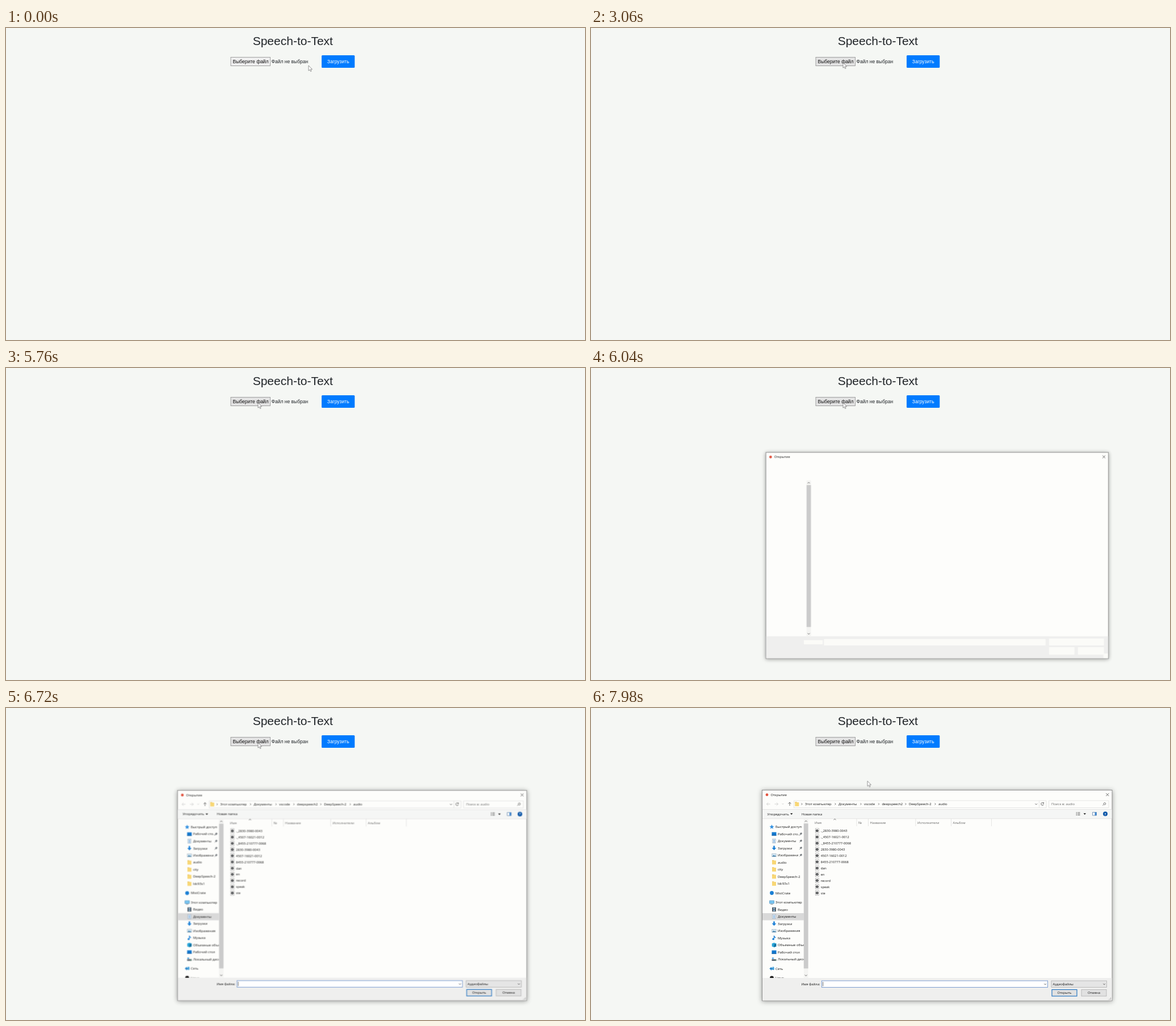
Animation of 1020x549 px, one loop 8 s. Source, as an HTML page:

```html
<!DOCTYPE html>
<html lang="ru">
<head>
<meta charset="utf-8">
<title>Speech-to-Text</title>
<style>
html, body { margin: 0; width: 100%; height: 100%; overflow: hidden; background: #f5f7f4; }
svg { display: block; width: 100%; height: 100%; }
.page { font-family: "Liberation Sans", Arial, sans-serif; font-size: 8.5px; }
.dialog { font-family: "Open Sans", "Noto Sans", sans-serif; font-size: 5.9px; fill: #141414;
  transform-origin: 609.75px 329.75px; animation: open 8s linear infinite; }
.frame { filter: drop-shadow(.5px 1.5px 4px rgba(0, 0, 0, .38)); }
.line { fill: none; stroke: #4a4a4a; stroke-width: .8; }
.soft { fill: none; stroke: #dcdcdc; stroke-width: .7; }
.pale { fill: none; stroke: #c8c8c8; stroke-width: .8; }
.dim { fill: #666; }
.cursor { animation: move 8s linear infinite; }
.choose { animation: hover 8s step-end infinite; }
.empty { animation: leave 8s step-end infinite; }
.full { animation: arrive 8s step-end infinite; }

@keyframes move {
  0% { transform: translate(533px, 66px); animation-timing-function: ease-in-out; }
  13.5% { transform: translate(547px, 84px); animation-timing-function: ease-in-out; }
  19% { transform: translate(451px, 69px); }
  23%, 26% { transform: translate(447px, 70px); animation-timing-function: ease-in-out; }
  35% { transform: translate(445px, 62px); }
  38.25%, 91.5% { transform: translate(444px, 61px); animation-timing-function: ease-in; }
  99.75%, 100% { transform: translate(487px, 128.5px); }
}
@keyframes hover { 0% { fill: #efefef; } 30% { fill: #e3e3e3; } 100% { fill: #e3e3e3; } }
@keyframes open {
  0%, 73.5% { transform: scale(.965); opacity: 0; }
  75.25% { transform: scale(.978); opacity: 1; }
  77.25% { transform: scale(.985); opacity: 1; }
  82% { transform: scale(.9935); opacity: 1; }
  85%, 100% { transform: scale(1); opacity: 1; }
}
@keyframes leave { 0% { opacity: 1; } 83.75% { opacity: 0; } 100% { opacity: 0; } }
@keyframes arrive { 0% { opacity: 0; } 83.75% { opacity: 1; } 100% { opacity: 1; } }
</style>
</head>
<body>
<svg viewBox="0 0 1020 549" preserveAspectRatio="none">
  <defs>
    <clipPath id="side"><rect x="302" y="195" width="72.5" height="279.5"/></clipPath>
  </defs>

  <g class="page">
    <text x="505.3" y="30" font-size="21" text-anchor="middle" fill="#212529">Speech-to-Text</text>
    <rect class="choose" x="396" y="51.5" width="69.5" height="15" stroke="#999" stroke-width=".9"/>
    <text x="399.5" y="61.8" fill="#111">Выберите файл</text>
    <text x="467.5" y="61.8" fill="#212529">Файл не выбран</text>
    <rect x="556" y="48" width="58.3" height="22" rx="1.5" fill="#007bff"/>
    <text x="585.2" y="61.8" text-anchor="middle" fill="#fff">Загрузить</text>
  </g>

  <g class="dialog">
    <rect class="frame" x="301.5" y="144.5" width="616.5" height="370.5" fill="#fdfdfb" stroke="#858585" stroke-width=".9"/>
    <circle cx="310" cy="152.7" r="2.4" fill="#e2533f"/>
    <text x="316.5" y="154.7">Открытие</text>
    <path class="line" d="M907.3 150l5 5m0-5l-5 5"/>
    <rect x="302" y="475" width="615.5" height="39.5" fill="#efefee"/>

    <g class="empty" fill="#fbfbf8">
      <rect x="370" y="482" width="34" height="7.5"/>
      <rect x="406" y="480" width="399" height="11.5"/>
      <rect x="811" y="479" width="99" height="12.5"/>
      <rect x="811" y="494.5" width="46" height="13.5"/>
      <rect x="863" y="494.5" width="47" height="13.5"/>
      <rect x="909" y="506" width="8" height="8"/>
    </g>

    <g class="full">
      <rect x="302" y="178.5" width="615.5" height="16" fill="#f5f6f5"/>
      <path class="soft" d="M302 178.5h615.5M302 194.7h615.5"/>
      <path class="pale" d="M315.5 169h-6m2.5-2.5l-2.5 2.5 2.5 2.5M323.5 169h6m-2.5-2.5l2.5 2.5-2.5 2.5M336.5 168l1.5 1.5 1.5-1.5"/>
      <path class="line" d="M350 172v-6m-2.5 2.5l2.5-2.5 2.5 2.5"/>
      <path class="soft" d="M357.5 163h444.5v12.5h-444.5zM789.5 163v12.5M806.5 163h105.5v12.5h-105.5z"/>
      <path class="line" d="M782.5 168.3l1.8 1.8 1.8-1.8M797.2 167.5a2.4 2.4 0 1 0 .3 2M797.5 166v1.8h-1.8"/>
      <g id="crumbs"></g>
      <text class="dim" x="811" y="171.2">Поиск в: audio</text>
      <path class="line" d="M901.5 171.5l2-2a1.8 1.8 0 1 1 .4 .4"/>

      <text x="310.5" y="188.5">Упорядочить</text>
      <path d="M351 185.3h4.4l-2.2 2.4z"/>
      <text x="371" y="188.5">Новая папка</text>
      <path class="line" d="M854.5 184h2m1 0h4M854.5 186.2h2m1 0h4M854.5 188.4h2m1 0h4"/>
      <path d="M867.6 185.3h4.4l-2.2 2.4z"/>
      <path d="M883.5 183.5h7v5.5h-7z" fill="#fff" stroke="#5b7fa8" stroke-width=".8"/>
      <path d="M887.5 183.5h3v5.5h-3z" fill="#3f86cf"/>
      <circle cx="906" cy="186.3" r="4" fill="#0b56a8"/>
      <text x="906" y="188.5" text-anchor="middle" fill="#fff" font-weight="700">?</text>

      <g id="cols"></g>
      <g id="files" font-size="5.7"></g>
      <g clip-path="url(#side)">
        <rect x="302" y="361" width="73" height="12.5" fill="#d9d9d9"/>
        <g id="tree"></g>
      </g>

      <text x="403.5" y="488" text-anchor="end">Имя файла:</text>
      <rect x="406.5" y="480" width="398" height="11.5" fill="#fff" stroke="#6f93cc" stroke-width=".9"/>
      <path class="line" d="M408.7 482v7.5M798.2 485l1.9 1.9 1.9-1.9"/>
      <rect x="811" y="480" width="97.5" height="11.5" fill="#e5e5e5" stroke="#b0b0b0" stroke-width=".8"/>
      <text x="813.5" y="488">Аудиофайлы</text>
      <path class="line" d="M902.2 485l1.9 1.9 1.9-1.9"/>
      <rect x="812" y="495.5" width="44" height="11.5" fill="#e1e1e1" stroke="#1b6fc0" stroke-width="1.1"/>
      <text x="834" y="503.4" text-anchor="middle">Открыть</text>
      <rect x="864" y="495.5" width="44" height="11.5" fill="#e1e1e1" stroke="#b0b0b0" stroke-width=".8"/>
      <text x="886" y="503.4" text-anchor="middle">Отмена</text>
      <path d="M915.5 509.5v4M913.5 511.5v2M911.5 512.8v.7" stroke="#aaa" stroke-width=".9"/>
    </g>

    <rect x="374.8" y="195" width="7.8" height="279.8" fill="#f4f4f2"/>
    <rect x="374.8" y="203.3" width="7.8" height="255" fill="#cbcbcb"/>
    <path class="line" d="M376.7 200.2l2-2 2 2M376.7 469.5l2 2 2-2"/>
  </g>

  <path class="cursor" d="M0 0v9.2l2.1-1.9 1.5 3.2 1.5-.7-1.5-3.1h2.9z" fill="#fff" stroke="#6a6a6a" stroke-width=".7"/>
</svg>
<script>
const put = (id, html) => document.getElementById(id).innerHTML = html;
const text = (x, y, s, cls = '') => `<text x="${x}" y="${y + 2.1}" class="${cls}">${s}</text>`;
const box = (x, y, w, h, fill) => `<rect x="${x}" y="${y}" width="${w}" height="${h}" fill="${fill}"/>`;
const path = (d, fill) => `<path d="${d}" fill="${fill}"/>`;
const at = (x, y, body) => `<g transform="translate(${x} ${y})">${body}</g>`;
const dot = fill => `<circle r="3.4" fill="${fill}"/>`;

// 8px icons centred on their own origin
const icons = {
  star: path('M0-4l1.1 2.7 2.9.2-2.2 1.9.7 2.9-2.5-1.6-2.5 1.6.7-2.9-2.2-1.9 2.9-.2z', '#2f8fe0'),
  desk: box(-4, -3, 8, 6, '#1479cf') + box(-4, 1.7, 8, 1.3, '#0a5ba5'),
  doc: box(-3, -4, 6, 8, '#8fa6bd') + box(-2.3, -3.3, 4.6, 6.6, '#f3f8fc') +
    [-2, -.2, 1.6].map(y => box(-1.5, y, 3, .8, '#4b8fd0')).join(''),
  down: path('M-1.3-4h2.6v3.6h2.5l-3.8 4.2-3.8-4.2h2.5z', '#1b7fd6'),
  pic: box(-4, -3, 8, 6, '#9aa7b3') + box(-3.4, -2.4, 6.8, 4.8, '#d9ecf8') +
    path('M-3.4 2.4l2.4-3 1.8 1.6 1.2-1 1.4 2.4z', '#4c86ad'),
  folder: box(-3.5, -3.7, 3.5, 2, '#e5b64a') + box(-3.5, -3, 7, 6.8, '#f8d775'),
  pc: box(-4.2, -3.3, 8.4, 5.5, '#3a86bd') + box(-3.5, -2.6, 7, 4.1, '#7cc8f2') + box(-2.2, 2.8, 4.4, .9, '#647887'),
  film: box(-3.3, -3.7, 6.6, 7.4, '#3d4650') + box(-1.7, -3, 3.4, 2.7, '#8db3cf') + box(-1.7, .4, 3.4, 2.7, '#8db3cf'),
  note: path('M-.7-4h1.2q.3 2 2.5 3l-.4 1.6q-1-1.1-2.1-1.4v3a1.9 1.6 0 1 1-1.2-1.5z', '#1c80d8'),
  cube: path('M0-3.9l3.8 1.3v5.2l-3.8 1.3-3.8-1.3v-5.2z', '#2aa5d8') + path('M0-1l3.8-1.6v5.2l-3.8 1.3z', '#13709f'),
  disk: box(-4, 0, 8, 3, '#5c6670') + box(-3.6, -2.6, 3, 1.9, '#2a93e0') + box(1.8, 1, 1.4, 1, '#6fe08a'),
  net: path('M-4.2 0l3.7-3v1.7h4.5v3h-4.5v1.7z', '#2b86cb') + box(1, -3, 2.8, 5.5, '#4ba5dd'),
  cloud: dot('#1a7fd4'),
  black: dot('#1d1d1d')
};

const tree = [
  [209, 'star', 'Быстрый доступ'], [221.5, 'desk', 'Рабочий сто…', 1],
  [234, 'doc', 'Документы', 1], [246.5, 'down', 'Загрузки', 1],
  [259, 'pic', 'Изображени', 1], [271.5, 'folder', 'audio'],
  [284, 'folder', 'city'], [296.5, 'folder', 'DeepSpeech-2'],
  [309, 'folder', 'ldc93s1'], [325.5, 'cloud', 'MistCrate'],
  [342, 'pc', 'Этот компьютер'], [354.5, 'film', 'Видео'],
  [367, 'doc', 'Документы'], [379.5, 'down', 'Загрузки'],
  [392, 'pic', 'Изображения'], [404.5, 'note', 'Музыка'],
  [417, 'cube', 'Объемные объекты'], [429.5, 'desk', 'Рабочий стол'],
  [442, 'disk', 'Локальный диск'], [458.5, 'net', 'Сеть'], [475, 'black', 'Linux']
];
const roots = ['star', 'cloud', 'pc', 'net', 'black'];
const pin = path('M.5-2.8l2.3 2.3-.8.3-1 1.1-.1 1.2-1.3-1.3-2 2-.4-.4 2-2-1.3-1.3 1.2-.1 1.1-1z', '#70757a');
put('tree', tree.map(([y, icon, label, pinned]) => {
  const root = roots.includes(icon);
  return at(root ? 318.5 : 322.5, y, icons[icon]) + text(root ? 325 : 329, y, label) +
    (pinned ? at(369.5, y, pin) : '');
}).join(''));

const crumbs = [[377, 'Этот компьютер'], [436, 'Документы'], [481, 'vscode'],
  [512.5, 'deepspeech2'], [560, 'DeepSpeech-2'], [612, 'audio']];
put('crumbs', at(362.8, 169, icons.folder) + crumbs.map(([x, s]) =>
  `<path class="line" d="M${x - 6.3} 167.5l1.5 1.5-1.5 1.5"/>` + text(x, 169, s)).join(''));

const cols = [[394, 'Имя', 468], [471, '№', 488.5], [491.5, 'Название', 572],
  [575, 'Исполнители', 634.5], [637.5, 'Альбом', 705.5]];
put('cols', cols.map(([x, s, end]) =>
  text(x, 201.5, s, 'dim') + `<path class="soft" d="M${end} 195v13"/>`).join('') +
  '<path class="line" d="M427.5 196.8l2-1.5 2 1.5"/>');

const names = ['2830-3980-0043', '4507-16021-0012', '8455-210777-0068'];
const files = [...names.map(n => '._' + n), ...names, 'dan', 'en', 'record', 'speak', 'ste'];
const audio = '<rect x="-3" y="-4" width="6" height="8" fill="#fff" stroke="#a5a5a5" stroke-width=".7"/>' +
  '<circle r="2.3" fill="#333"/><circle r=".8" fill="#d8e4ee"/>';
put('files', files.map((s, i) => {
  const y = 216 + i * 10.95;
  return at(398.3, y, audio) + text(404.7, y, s);
}).join(''));
</script>
</body>
</html>
```
